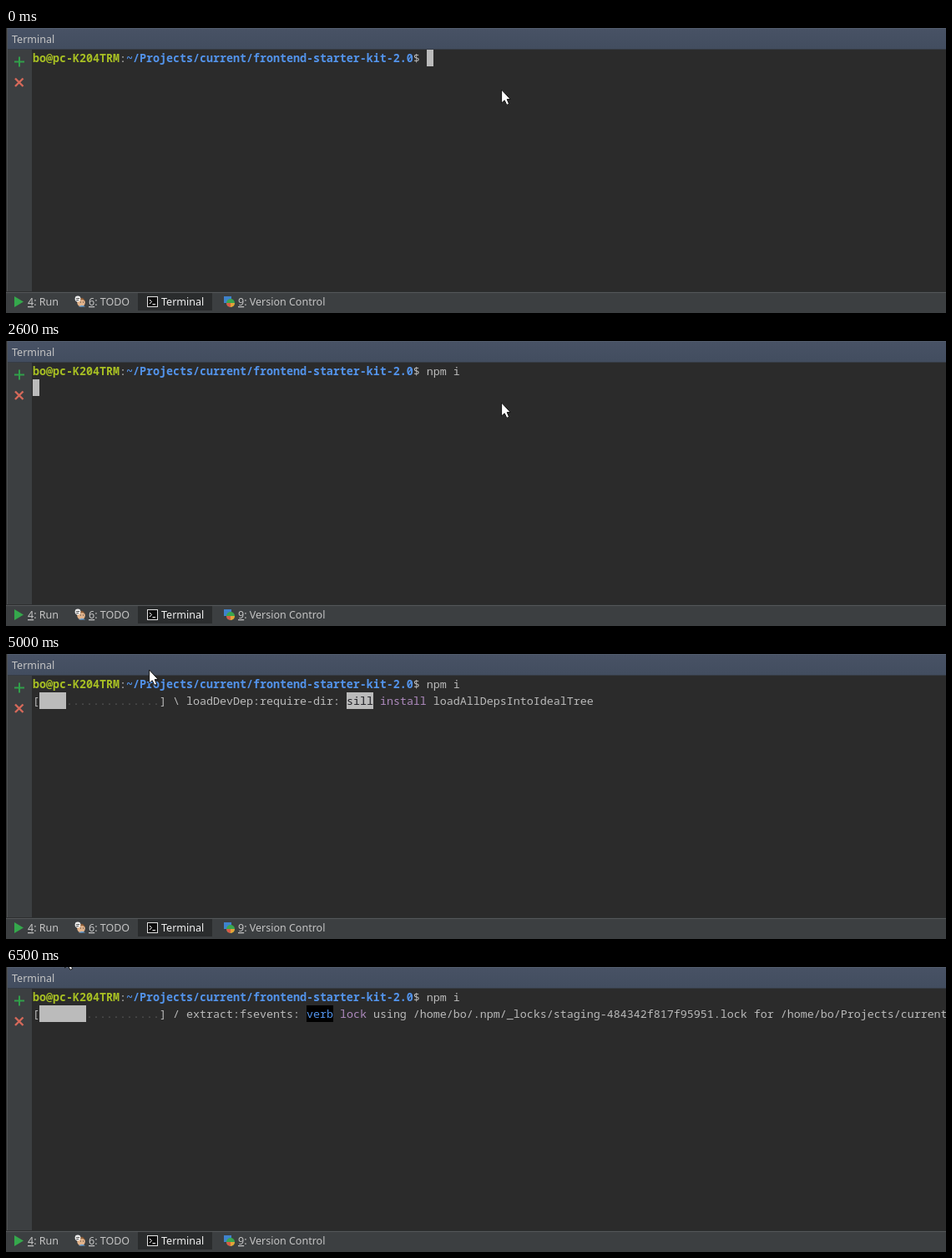
An HTML page that plays this animation: 1126 by 342 pixels, repeating every 6600 ms.

```html
<!DOCTYPE html>
<html lang="en">
<head>
<meta charset="utf-8">
<title>Terminal</title>
<style>
html, body { margin: 0; width: 100%; height: 100%; overflow: hidden; background: #2b2b2b; }
#stage { position: relative; width: 1126px; height: 342px; overflow: hidden; background: #2b2b2b; }
#chrome, #mouse { position: absolute; left: 0; top: 0; }
#chrome text { font: 12.5px "Noto Sans", "Open Sans", sans-serif; fill: #c4c4c4; }
.key { text-decoration: underline; }
#term { position: absolute; left: 32px; top: 26px; width: 1094px; height: 290px; overflow: hidden;
  font: 13.333px/20px "Noto Sans Mono", "DejaVu Sans Mono", monospace; color: #bbb; }
#term div { height: 20px; white-space: pre; }
#term span { display: inline-block; height: 20px; vertical-align: top; }
.user { color: #a8c023; font-weight: 700; }
.path { color: #5394ec; font-weight: 700; }
.block { background: #bbb; }
.dots { color: #555; }
.sill { background: #bbb; color: #1f1f24; }
.verb { background: #000; color: #5394ec; }
.info { color: #a8c023; }
.task { color: #ae8abe; }
</style>
</head>
<body>
<div id="stage">
  <svg id="chrome" width="1126" height="342">
    <defs>
      <linearGradient id="head" x2="0" y2="1">
        <stop stop-color="#485265"/><stop offset="1" stop-color="#424d5f"/>
      </linearGradient>
    </defs>
    <rect width="1126" height="26" fill="url(#head)"/>
    <path d="M0 .5H1126" stroke="#525c6c"/>
    <path d="M0 25.5H1126" stroke="#363c46"/>
    <rect y="26" width="31" height="291" fill="#3c3f41"/>
    <path d="M.5 0V317" stroke="#2b2b2b"/>
    <path d="M1.5 0V317" stroke="#505355"/>
    <text x="7" y="18">Terminal</text>
    <path d="M10 40.5H22M16 34.5V46.5" stroke="#31a04a" stroke-width="2"/>
    <path d="M11 60.5L20.5 70M20.5 60.5L11 70" stroke="#d5695a" stroke-width="2.4"/>

    <rect y="316" width="1126" height="26" fill="#3c3f41"/>
    <path d="M0 316.5H1126" stroke="#2d2f30"/>
    <path d="M0 317.5H1126" stroke="#555759"/>
    <rect x="158" y="318" width="89" height="21" fill="#2a2c2d"/>
    <path d="M10 322L21 328.5L10 335Z" fill="#35a84c"/>
    <text x="26" y="333"><tspan class="key">4</tspan>: Run</text>
    <g>
      <circle cx="90" cy="329.5" r="4.8" fill="#e3b48c"/>
      <path d="M86 327Q91 320 95 328L92 326Z" fill="#8a5a35"/>
      <circle cx="86" cy="325" r="3.4" fill="#f1f1f1"/>
      <path d="M84 324.5H88M84 326.5H87" stroke="#555"/>
      <path d="M87 334.5Q91 331 95 334.5Z" fill="#6aa3d8"/>
      <path d="M89 329H90M92 329H93" stroke="#333"/>
    </g>
    <text x="99" y="333"><tspan class="key">6</tspan>: TODO</text>
    <rect x="169.5" y="322.5" width="12" height="12" fill="#0c0c0c" stroke="#e0e0e0"/>
    <path d="M172 326L174.5 328.5L172 331M175.5 331.5H179" fill="none" stroke="#fff"/>
    <text x="186" y="333" style="fill:#f0f0f0">Terminal</text>
    <rect x="261" y="322" width="9" height="8" fill="#3f82cc"/>
    <circle cx="269" cy="330" r="5" fill="#3ba64e"/>
    <path d="M269 330H274A5 5 0 0 1 269 335Z" fill="#e6a338"/>
    <path d="M269 330V335A5 5 0 0 1 264 330Z" fill="#d85a47"/>
    <text x="278" y="333"><tspan class="key">9</tspan>: Version Control</text>
  </svg>
  <div id="term">
    <div><span class="user">bo@pc-K204TRM</span>:<span class="path">~/Projects/current/frontend-starter-kit-2.0</span>$ <span id="cmd"></span></div>
    <div id="out"></div>
  </div>
  <svg id="mouse" width="12" height="20">
    <path d="M.6 1V17L4.2 13.8L6.8 19.4L9.6 18.2L7.2 12.6H11.3Z" fill="#fff" stroke="#111"/>
  </svg>
</div>
<script>
const LOOP = 6600;
const byId = id => document.getElementById(id);
const span = (cls, text) => `<span class="${cls}">${text}</span>`;
const caret = span('block', ' ');

const bar = (done, spin) =>
  '[' + (done ? span('block', ' '.repeat(done)) : '') + span('dots', '.'.repeat(18 - done)) + `] ${spin} `;
const progress = (done, spin, label, level, task, rest) =>
  bar(done, spin) + `${label}: ${span(level, level)} ${span('task', task)} ${rest}`;
const dep = (done, spin, name, kind = 'loadDep') =>
  progress(done, spin, `${kind}:${name}`, 'sill', 'install', 'loadAllDepsIntoIdealTree');

// [start ms, markup]
const typed = [
  [0, caret], [400, ''], [800, caret], [900, 'n' + caret], [1000, 'np' + caret],
  [1100, 'npm' + caret], [1400, 'npm ' + caret], [1700, 'npm i' + caret], [2200, 'npm i']
];
const output = [
  [0, ''],
  [2600, caret],
  [3000, bar(0, '/')],
  [3100, progress(1, '|', 'preinstall:Fe-starter', 'info', 'lifecycle', 'Fe-starter@1.0.0~preinstall: Fe-starter@1.0.0')],
  [4500, progress(1, '/', 'loadIdealTree:loadAllDepsIntoIdealTree', 'sill', 'install', 'loadIdealTree')],
  [5000, dep(4, '\\', 'require-dir', 'loadDevDep')],
  [5100, dep(4, '|', 'graceful-fs')],
  [5300, dep(4, '/', 'minimatch')],
  [5400, dep(4, '|', 'es5-ext')],
  [5500, dep(4, '\\', 'es6-weak-map')],
  [5600, dep(4, '/', 'read-pkg-up')],
  [5700, dep(5, '-', 'get-stdin')],
  [5800, dep(5, '\\', 'trim-newlines')],
  [5900, dep(5, '|', 'array-uniq')],
  [6200, progress(7, '|', 'diffTrees', 'sill', 'install', 'generateActionsToTake')],
  [6400, progress(7, '-', 'extract:fsevents', 'sill', 'extract', 'fsevents@1.1.2')],
  [6500, progress(7, '/', 'extract:fsevents', 'verb', 'lock',
    'using /home/bo/.npm/_locks/staging-484342f817f95951.lock for /home/bo/Projects/current/frontend-starter-kit-2.0')]
];
// [start ms, x, y]
const moves = [
  [0, 593, 73], [4700, 420, 46], [4800, 241, 20], [5000, 171, 18], [5100, 143, 18],
  [5300, 112, 6], [5400, 95, 0], [5500, 84, -4], [5600, 78, -8], [5700, 73, -12],
  [5800, 70, -14], [6000, 70, -16]
];

const at = (steps, t) => steps.findLast(s => s[0] <= t);
const shown = {};
function show(id, html) {
  if (shown[id] !== html) byId(id).innerHTML = shown[id] = html;
}

const start = performance.now();
function draw() {
  const t = (performance.now() - start) % LOOP;
  show('cmd', at(typed, t)[1]);
  show('out', at(output, t)[1]);
  const [, x, y] = at(moves, t);
  byId('mouse').style.transform = `translate(${x}px, ${y}px)`;
  requestAnimationFrame(draw);
}
draw();
</script>
</body>
</html>
```
